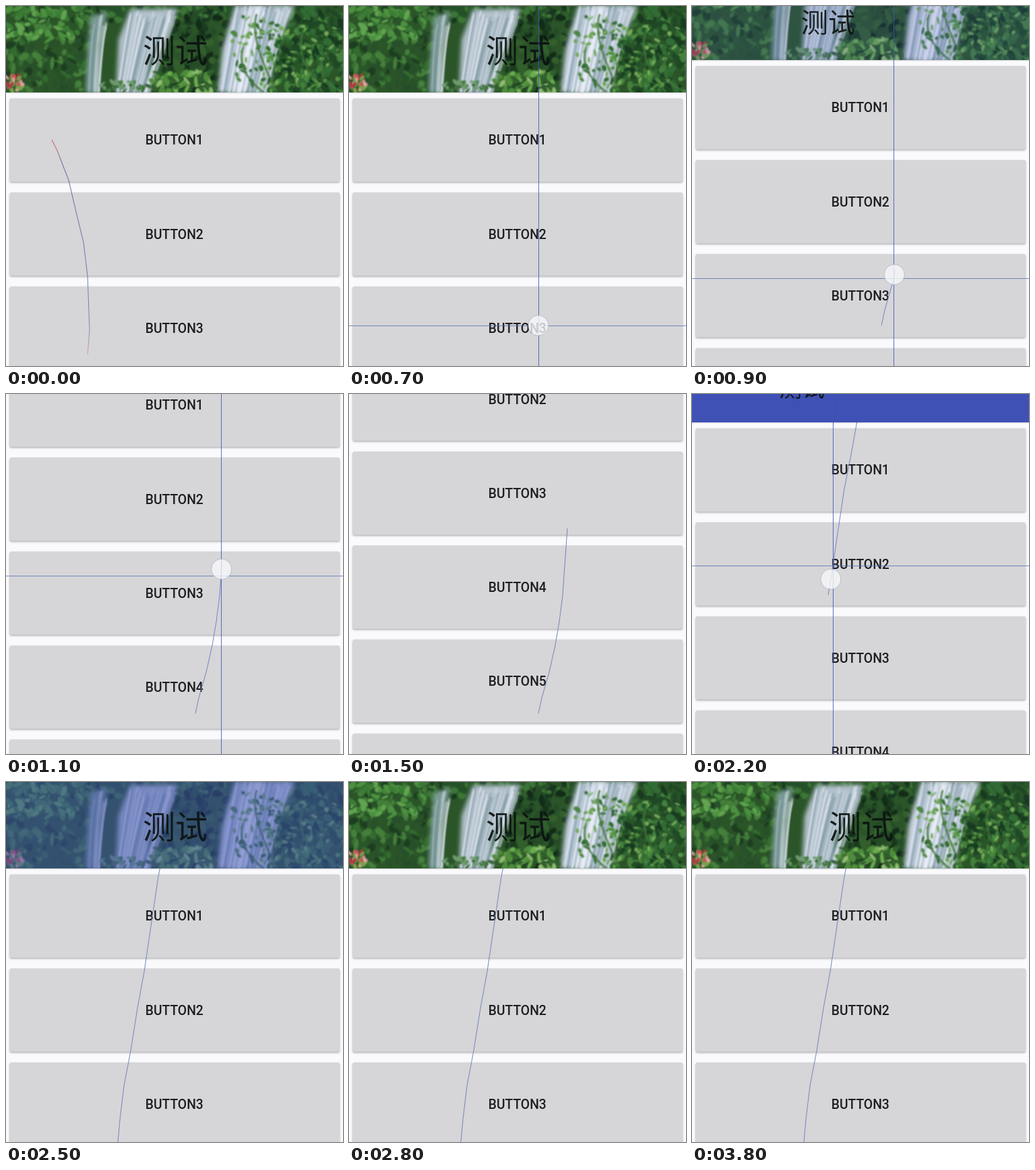
These frames come from a looping animation (500 by 533 pixels, 3900 ms). An HTML page with a canvas:

```html
<!DOCTYPE html>
<html lang="zh-CN">
<head>
<meta charset="utf-8">
<style>
  html, body { margin: 0; width: 100%; height: 100%; overflow: hidden; background: #fafafd; }
  canvas { display: block; }
</style>
</head>
<body>
<canvas id="stage" width="500" height="533"></canvas>
<script>
const W = 500, H = 533, LOOP = 3900, STEP = 100;
const HEADER = 128, MAX_SCROLL = 343;
const ctx = document.getElementById('stage').getContext('2d');

// Swipe trails as x,y points, and the finger height on each step of a swipe
const trails = {
  previous: [[68,198],[76,214],[93,258],[104,305],[115,350],[121,400],[124,480],[121,516]],
  up: [[281,473],[286,450],[297,412],[306,372],[312,337],[317,298],[319,269],[321,240],[324,199]],
  down: [[247,0],[245,40],[236,90],[226,140],[217,200],[209,254],[205,281],[195,335],
         [185,398],[175,450],[169,500],[166,533]]
};
const swipes = [
  { trail: trails.up, start: 7, ys: [473, 441, 403, 338, 269, 199] },
  { trail: trails.down, start: 20, ys: [5, 110, 254, 385, 490] }
];

const clamp = (v, lo, hi) => Math.min(hi, Math.max(lo, v));

function fingerAt(step) {
  for (const { trail, start, ys } of swipes) {
    const y = ys[step - start];
    if (y !== undefined) return { trail, y, speed: y - (ys[step - start - 1] ?? y) };
  }
  return null;
}

function scrollAt(step) {
  if (step < 7) return 0;
  if (step <= 12) return Math.max(0, 451 - fingerAt(step).y);
  if (step < 20) return 345 - 93 * 0.544 ** (step - 12);
  const finger = fingerAt(step);
  return finger ? clamp(340 - finger.y, 0, MAX_SCROLL) : 0;
}

function scrimAt(step) {
  if (step < 20) return clamp((step - 8) / 6, 0, 1);
  return clamp((28 - step) / 6, 0, 1);
}

// Part of a trail from its start up to height y
function cutTrail(trail, y) {
  const dir = Math.sign(trail[trail.length - 1][1] - trail[0][1]);
  const part = [trail[0]];
  for (let i = 1; i < trail.length; i++) {
    const [x0, y0] = trail[i - 1], [x1, y1] = trail[i];
    if ((y - y1) * dir < 0) {
      part.push([x0 + (x1 - x0) * (y - y0) / (y1 - y0), y]);
      break;
    }
    part.push(trail[i]);
  }
  return part;
}

const xAt = (trail, y) => cutTrail(trail, y).pop()[0];

function strokePoints(points, style) {
  ctx.strokeStyle = style;
  ctx.lineWidth = 1;
  ctx.beginPath();
  points.forEach(([x, y]) => ctx.lineTo(x, y));
  ctx.stroke();
}

function makePhoto() {
  const canvas = document.createElement('canvas');
  canvas.width = W;
  canvas.height = HEADER;
  const g = canvas.getContext('2d');
  let seed = 11;
  const rnd = () => (seed = (seed * 16807) % 2147483647) / 2147483647;

  const leaves = (n, x, y, w, h, size, colors) => {
    for (let i = 0; i < n; i++) {
      g.fillStyle = colors[Math.floor(rnd() * colors.length)];
      g.beginPath();
      g.ellipse(x + rnd() * w, y + rnd() * h, size * (0.5 + rnd()), size * (0.3 + rnd() * 0.5),
        rnd() * 3, 0, 7);
      g.fill();
    }
  };
  const shape = (fill, ...p) => {
    g.fillStyle = fill;
    g.beginPath();
    for (let i = 0; i < p.length; i += 2) g.lineTo(p[i], p[i + 1]);
    g.fill();
  };
  const streaks = (n, x0, x1, y0, b0, b1, y1) => {
    for (let i = 0; i < n; i++) {
      const u = rnd(), top = x0 + (x1 - x0) * u;
      g.strokeStyle = rnd() < 0.6 ? 'rgba(240,244,252,.5)' : 'rgba(110,140,150,.4)';
      g.lineWidth = 1 + rnd() * 2;
      g.beginPath();
      g.moveTo(top, y0 + rnd() * 20);
      g.quadraticCurveTo(top - 6, y0 + 30, b0 + (b1 - b0) * u, y1);
      g.stroke();
    }
  };

  g.fillStyle = '#2b5529';
  g.fillRect(0, 0, W, HEADER);
  g.filter = 'blur(1px)';
  leaves(170, 0, 0, 130, 128, 7, ['#346b30', '#28502a', '#467f3c', '#1d3e20']);
  leaves(70, 0, 0, 110, 50, 6, ['#4c9140', '#3c7d36', '#62a450']);
  leaves(90, 110, 0, 230, 22, 6, ['#26512a', '#3d7638', '#173520']);
  leaves(110, 225, 15, 110, 113, 8, ['#1a3a20', '#254c26', '#335f2d', '#122c18']);
  leaves(130, 400, 0, 100, 128, 8, ['#1f4825', '#326c35', '#183a20', '#44813d']);

  g.filter = 'blur(3px)';
  shape('#809f9a', 126,16, 150,8, 138,60, 138,128, 118,128, 122,60);
  shape('#b3c2cd', 184,5, 254,4, 240,45, 212,80, 212,128, 163,128, 167,50);
  shape('#c7d2e2', 340,0, 428,0, 410,40, 396,80, 390,128, 314,128, 322,60);
  g.filter = 'blur(.8px)';
  streaks(16, 128, 150, 12, 120, 138, 128);
  streaks(50, 184, 252, 5, 165, 213, 128);
  streaks(55, 342, 424, -10, 318, 388, 128);

  leaves(65, 212, 98, 95, 30, 6, ['#4f8d3c', '#6dad51', '#315f2d', '#91bd72']);
  leaves(30, 140, 112, 80, 16, 4, ['#345e34', '#4a8042', '#6e9b70']);
  leaves(55, 335, 15, 60, 110, 4, ['#4d8743', '#6ea557', '#326a34']);
  leaves(150, 385, 25, 115, 103, 4, ['#4e923f', '#76ad59', '#204923', '#2f6731']);
  g.strokeStyle = '#41763a';
  for (const [x, y] of [[372, 12], [352, 60], [440, 40], [470, 75]]) {
    g.beginPath();
    g.moveTo(x, y);
    g.quadraticCurveTo(x - 12, y + 35, x + 30, HEADER);
    g.stroke();
  }
  leaves(28, 0, 102, 24, 26, 4, ['#d9435a', '#c23346', '#e9a5a5', '#78a24b']);
  return canvas;
}

const photo = makePhoto();

function drawButton(index, scroll) {
  const y = 136.8 + 139.2 * index - scroll;
  ctx.save();
  ctx.shadowColor = 'rgba(0,0,0,.3)';
  ctx.shadowBlur = 3;
  ctx.shadowOffsetY = 1.5;
  ctx.fillStyle = '#d6d5d8';
  ctx.beginPath();
  ctx.roundRect(5.5, y, 489.5, 123.4, 2.5);
  ctx.fill();
  ctx.restore();
  ctx.fillStyle = '#1c1e20';
  ctx.font = '500 19.3px Roboto, sans-serif';
  ctx.fillText('BUTTON' + (index + 1), 249.8, y + 68.6);
}

function drawHeader(scroll, scrim) {
  const bottom = HEADER - scroll;
  if (bottom < -10) return;
  ctx.drawImage(photo, 0, -scroll);
  ctx.globalAlpha = scrim;
  ctx.fillStyle = '#3f51b5';
  ctx.fillRect(0, -scroll, W, HEADER);
  ctx.globalAlpha = 1;
  ctx.fillStyle = 'rgba(0,0,0,.12)';
  ctx.fillRect(0, bottom, W, 1.5);

  const p = scroll / 86;
  ctx.fillStyle = 'rgba(12,18,16,.92)';
  ctx.font = `${48 - 14 * p}px "Noto Sans CJK SC", "Noto Sans CJK", sans-serif`;
  ctx.fillText('测试', 251 - 88 * p, 84 - 80 * p);
}

function drawTrail(step, finger) {
  const trail = step < 7 ? trails.previous : step < 20 ? trails.up : trails.down;
  let style = '#7385bb';
  if (trail === trails.previous) {
    style = ctx.createLinearGradient(0, 198, 0, 516);
    [[0, '#d84a50'], [0.06, '#b46270'], [0.1, '#596794'], [0.85, '#7385bb'], [1, '#d9a0a0']]
      .forEach(([at, color]) => style.addColorStop(at, color));
  }
  strokePoints(finger ? cutTrail(trail, finger.y + finger.speed * 0.3) : trail, style);
}

function drawPointer({ trail, y, speed }) {
  const x = Math.round(xAt(trail, y)) + 0.5, lineY = Math.round(y) + 0.5;
  strokePoints([[x, 0], [x, H]], 'rgba(60,90,175,.85)');
  strokePoints([[0, lineY], [W, lineY]], 'rgba(75,110,175,.75)');
  const touchY = y + speed * 0.14;
  ctx.beginPath();
  ctx.arc(xAt(trail, touchY), touchY, 15, 0, 7);
  ctx.fillStyle = 'rgba(248,248,250,.78)';
  ctx.fill();
  ctx.strokeStyle = 'rgba(165,175,190,.7)';
  ctx.stroke();
}

function draw(time) {
  const step = Math.floor((time % LOOP) / STEP);
  const scroll = scrollAt(step), finger = fingerAt(step);
  ctx.fillStyle = '#fafafd';
  ctx.fillRect(0, 0, W, H);
  ctx.textAlign = 'center';
  for (let i = 0; i < 7; i++) drawButton(i, scroll);
  drawTrail(step, finger);
  drawHeader(scroll, scrimAt(step));
  if (finger) drawPointer(finger);
}

const begin = performance.now();
function tick() {
  draw(performance.now() - begin);
  requestAnimationFrame(tick);
}
tick();
</script>
</body>
</html>
```
